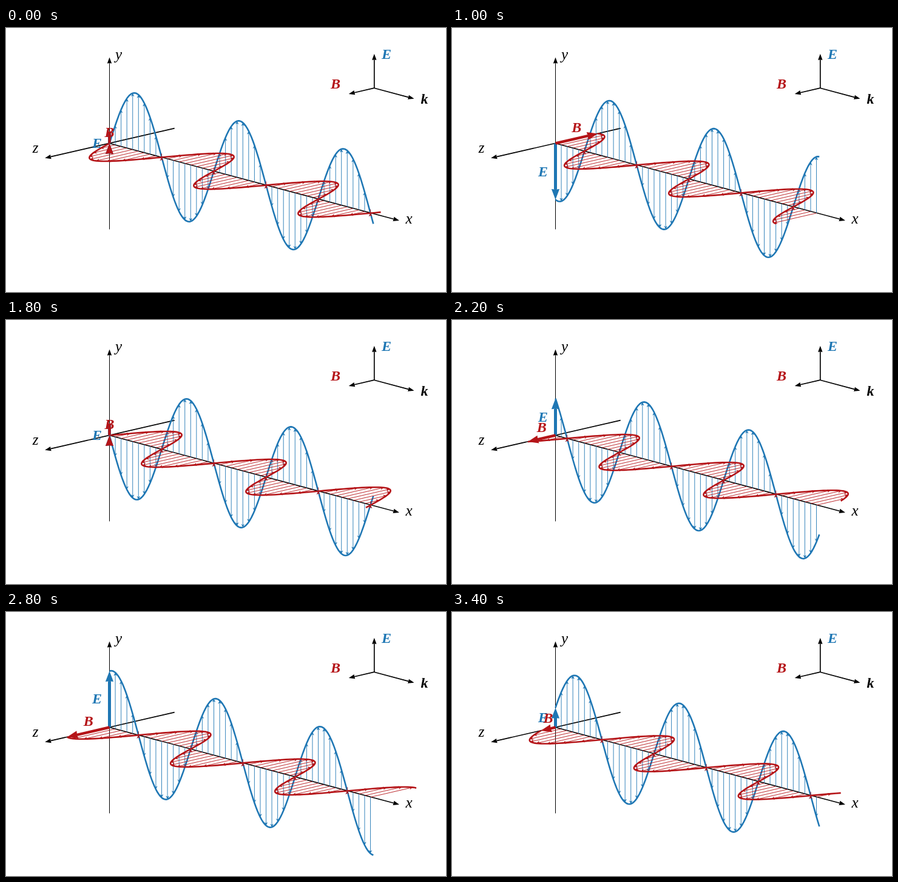
Write an HTML page that moves like this. It is 725x436 px and loops after 3500 ms.

```html
<!DOCTYPE html>
<html lang="en">
<head>
<meta charset="utf-8">
<title>Electromagnetic wave</title>
<style>
  html, body { margin: 0; width: 100%; height: 100%; overflow: hidden; background: #fff; }
  svg { display: block; width: 725px; height: 436px; }
  text { font: italic 25px "Liberation Serif", "Times New Roman", serif; text-anchor: middle; }
  .vec { font-size: 24px; font-weight: bold; }
</style>
</head>
<body>
<svg id="stage" viewBox="0 0 725 436"></svg>
<script>
const BLUE = '#1f77b4', RED = '#b51418', BLACK = '#000';
const ORIGIN = [170.5, 190.5];
const RAD = Math.PI / 180;
const STEP = 172 / 18;          // horizontal distance between vectors, 20 degrees apart
const SLOPE_X = Math.tan(15 * RAD), SLOPE_Z = Math.tan(13 * RAD);
const AMP_E = 94.5, AMP_B = 70.8;
const VECTORS = 45, END = 910;

const stage = document.getElementById('stage');

function add(tag, attrs, text) {
  const el = document.createElementNS('http://www.w3.org/2000/svg', tag);
  for (const key in attrs) el.setAttribute(key, attrs[key]);
  if (text) el.textContent = text;
  return stage.appendChild(el);
}

const stroke = (color, width) =>
  add('path', { fill: 'none', stroke: color, 'stroke-width': width, 'stroke-linejoin': 'round' });
const fill = color => add('path', { fill: color });
const label = (text, x, y, color = BLACK, cls = '') => add('text', { x, y, fill: color, class: cls }, text);
const pt = (x, y) => x.toFixed(2) + ' ' + y.toFixed(2);

// Arrow from a to b; an arrow without length points up, its shaft beyond the tip.
function arrow(a, b, len, half, notch) {
  const dx = b[0] - a[0], dy = b[1] - a[1], size = Math.hypot(dx, dy);
  const flat = size < 0.01;
  const ux = flat ? 0 : dx / size, uy = flat ? -1 : dy / size;
  const at = (back, side) => pt(b[0] - ux * back - uy * side, b[1] - uy * back + ux * side);
  const shaftEnd = at(flat ? -len * 1.06 : Math.min(notch, size), 0);
  return {
    shaft: 'M' + pt(...a) + 'L' + shaftEnd,
    head: 'M' + at(0, 0) + 'L' + at(len, half) + 'L' + at(notch, 0) + 'L' + at(len, -half) + 'Z'
  };
}

function axis(a, b, width) {
  const { shaft, head } = arrow(a, b, 10, 3.7, 9.6);
  stroke(BLACK, width).setAttribute('d', shaft);
  fill(BLACK).setAttribute('d', head);
}

// Main axes
axis(ORIGIN, [648, 318], 1.6);
axis([170.5, 332.5], [170.5, 48.5], 1);
axis([277.7, 165.6], [64.2, 214.8], 1.6);
label('x', 664, 323);
label('y', 185.5, 52);
label('z', 48.5, 205.5);

// Direction triad
const HUB = [606.8, 99.2];
axis(HUB, [606.8, 42.8], 1.7);
axis(HUB, [672.5, 116.8], 1.7);
axis(HUB, [564.7, 108.9], 1.7);
label('E', 627, 51, BLUE, 'vec');
label('B', 543, 100, RED, 'vec');
label('k', 689.5, 125, BLACK, 'vec');

function field(color, offset) {
  const shafts = stroke(color, 0.9), heads = fill(color), curve = stroke(color, 2.6);

  const foot = deg => {
    const d = deg / 20 * STEP;
    return [ORIGIN[0] + d, ORIGIN[1] + d * SLOPE_X];
  };
  const tip = (deg, phase) => {
    const [x, y] = foot(deg), [ox, oy] = offset(Math.sin((deg - phase) * RAD));
    return [x + ox, y + oy];
  };

  return phase => {
    let s = '', h = '', c = '';
    for (let k = 1; k <= VECTORS; k++) {
      const a = arrow(foot(k * 20), tip(k * 20, phase), 5.6, 2.8, 3.8);
      s += a.shaft;
      h += a.head;
    }
    for (let deg = 0; deg <= END; deg += 5) c += (deg ? 'L' : 'M') + pt(...tip(deg, phase));
    shafts.setAttribute('d', s);
    heads.setAttribute('d', h);
    curve.setAttribute('d', c);
    return tip(0, phase);
  };
}

const electric = field(BLUE, v => [0, -AMP_E * v]);
const magnetic = field(RED, v => [-AMP_B * v, AMP_B * SLOPE_Z * v]);

function mainVector(name, color, width, place) {
  const shaft = stroke(color, width), head = fill(color);
  const text = label(name, 0, 0, color, 'vec');
  return end => {
    const a = arrow(ORIGIN, end, 17.5, 6.6, 16.8);
    shaft.setAttribute('d', a.shaft);
    head.setAttribute('d', a.head);
    const [x, y] = place((ORIGIN[0] + end[0]) / 2, (ORIGIN[1] + end[1]) / 2);
    text.setAttribute('x', x);
    text.setAttribute('y', y);
  };
}

const mainE = mainVector('E', BLUE, 5, (x, y) => [150, y + 7.5]);
const mainB = mainVector('B', RED, 4.4, (x, y) => [x, y - 10.5]);

function draw(ms) {
  const phase = Math.floor((ms % 3500) / 100) * 10;
  mainE(electric(phase));
  mainB(magnetic(phase));
}

const start = performance.now();
function tick() {
  draw(performance.now() - start);
  requestAnimationFrame(tick);
}
tick();
</script>
</body>
</html>
```
